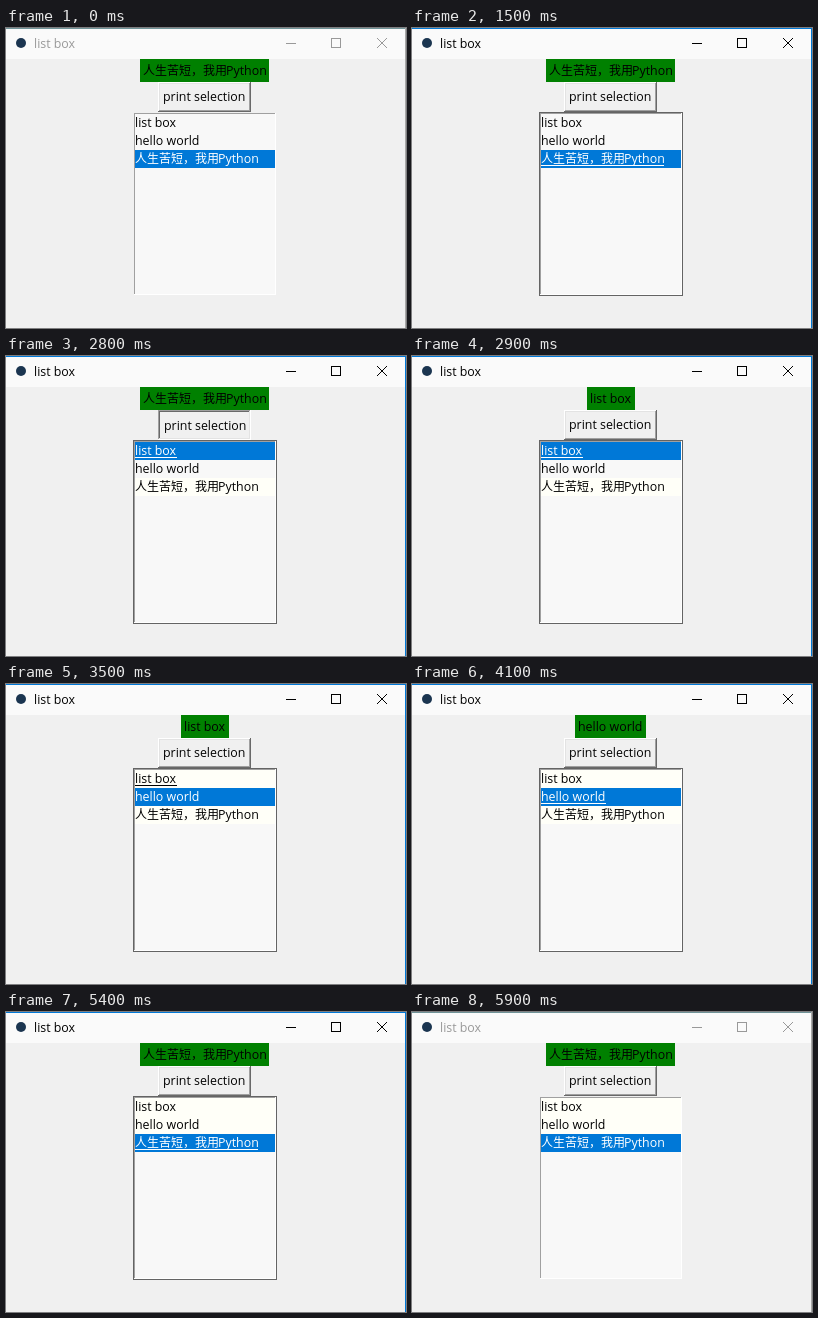
An HTML page with a canvas for the animation above (6000 ms loop, 400x300 px).

```html
<!DOCTYPE html>
<html lang="en">
<head>
<meta charset="utf-8">
<title>list box</title>
<style>
html, body { margin: 0; width: 100%; height: 100%; overflow: hidden; background: #f0f0f0; }
canvas { display: block; width: 400px; height: 300px; }
</style>
</head>
<body>
<canvas id="stage" width="400" height="300"></canvas>
<script>
const ctx = document.getElementById('stage').getContext('2d');
const LOOP = 6000;
const ITEMS = [
  { latin: 'list box', width: 42 },
  { latin: 'hello world', width: 65 },
  { cjk: '人生苦短，我用', latin: 'Python', width: 123 }
];
const LATIN = '12.4px "Open Sans", "Noto Sans", sans-serif';
const CJK = '12px "Noto Sans CJK SC", "Noto Sans CJK", "Noto Sans CJK JP", sans-serif';
const CJK_WIDTH = 83;
const BLUE = '#0078d7';

// Each step changes part of the window state.
const STEPS = [
  [0, { focus: false, label: 2, selected: 2, underlined: 2, pressed: false, tinted: [] }],
  [1500, { focus: true }],
  [2400, { selected: 0, underlined: 0, tinted: [2] }],
  [2800, { pressed: true }],
  [2900, { pressed: false, label: 0 }],
  [3500, { selected: 1, tinted: [0, 2] }],
  [3600, { underlined: 1 }],
  [4100, { label: 1 }],
  [4800, { selected: 2, underlined: 2, tinted: [0, 1] }],
  [5300, { pressed: true }],
  [5400, { pressed: false, label: 2 }],
  [5900, { focus: false }]
];

function stateAt(t) {
  const state = {};
  for (const [start, change] of STEPS) if (t >= start) Object.assign(state, change);
  return state;
}

function rect(x, y, w, h, color) {
  ctx.fillStyle = color;
  ctx.fillRect(x, y, w, h);
}

function bevel(x, y, w, h, light, dark) {
  rect(x, y, w, 1, light);
  rect(x, y, 1, h, light);
  rect(x, y + h - 1, w, 1, dark);
  rect(x + w - 1, y, 1, h, dark);
}

function text(item, x, y, color) {
  ctx.fillStyle = color;
  if (item.cjk) {
    ctx.font = CJK;
    ctx.fillText(item.cjk, x, y);
    x += CJK_WIDTH;
  }
  ctx.font = LATIN;
  ctx.fillText(item.latin, x, y);
}

function drawTitleBar(focus) {
  const ink = focus ? '#000' : '#999';
  rect(0, 0, 400, 31, '#fafafa');
  ctx.fillStyle = '#1b3550';
  ctx.beginPath();
  ctx.arc(15, 15, 5, 0, Math.PI * 2);
  ctx.fill();
  text(ITEMS[0], 28, 20, ink);

  rect(280, 15, 10, 1, ink);
  ctx.strokeStyle = ink;
  ctx.lineWidth = 1;
  ctx.strokeRect(325.5, 10.5, 9, 9);
  ctx.beginPath();
  ctx.moveTo(371, 10);
  ctx.lineTo(381, 20);
  ctx.moveTo(381, 10);
  ctx.lineTo(371, 20);
  ctx.stroke();

  rect(0, 0, 400, 1, focus ? BLUE : '#6f9398');
  rect(399, 0, 1, 300, focus ? BLUE : '#a8a8a8');
}

function drawLabel(item) {
  const w = item.width + 6;
  const x = Math.floor(199 - w / 2);
  rect(x, 31, w, 23, '#008000');
  text(item, x + 3, 47, '#000');
}

function drawButton(pressed) {
  const shift = pressed ? 1 : 0;
  rect(152, 54, 93, 30, '#f0f0f0');
  if (pressed) {
    bevel(152, 54, 93, 30, '#a0a0a0', '#fff');
    bevel(153, 55, 91, 28, '#696969', '#e3e3e3');
  } else {
    bevel(152, 54, 93, 30, '#fff', '#696969');
    bevel(153, 55, 91, 28, '#e3e3e3', '#a0a0a0');
  }
  text({ latin: 'print selection' }, 157 + shift, 73 + shift, '#000');
}

function drawList(state) {
  const frame = state.focus ? '#646464' : '#f0f0f0';
  rect(128, 85, 142, 182, '#f8f8f8');
  bevel(127, 84, 144, 184, frame, frame);
  bevel(128, 85, 142, 182, '#a0a0a0', '#fff');
  ITEMS.forEach((item, i) => {
    const y = 86 + i * 18;
    const selected = i === state.selected;
    const ink = selected ? '#fff' : '#000';
    if (selected) rect(129, y, 140, 18, BLUE);
    else if (state.tinted.includes(i)) rect(129, y, 140, 18, '#fffff8');
    text(item, 129, y + 13, ink);
    if (state.focus && i === state.underlined) rect(129, y + 15, item.width, 1, ink);
  });
}

function draw(now) {
  const state = stateAt(now % LOOP);
  rect(0, 0, 400, 300, '#f0f0f0');
  drawTitleBar(state.focus);
  drawLabel(ITEMS[state.label]);
  drawButton(state.pressed);
  drawList(state);
}

const origin = performance.now();
function tick() {
  draw(performance.now() - origin);
  requestAnimationFrame(tick);
}
tick();
</script>
</body>
</html>
```
